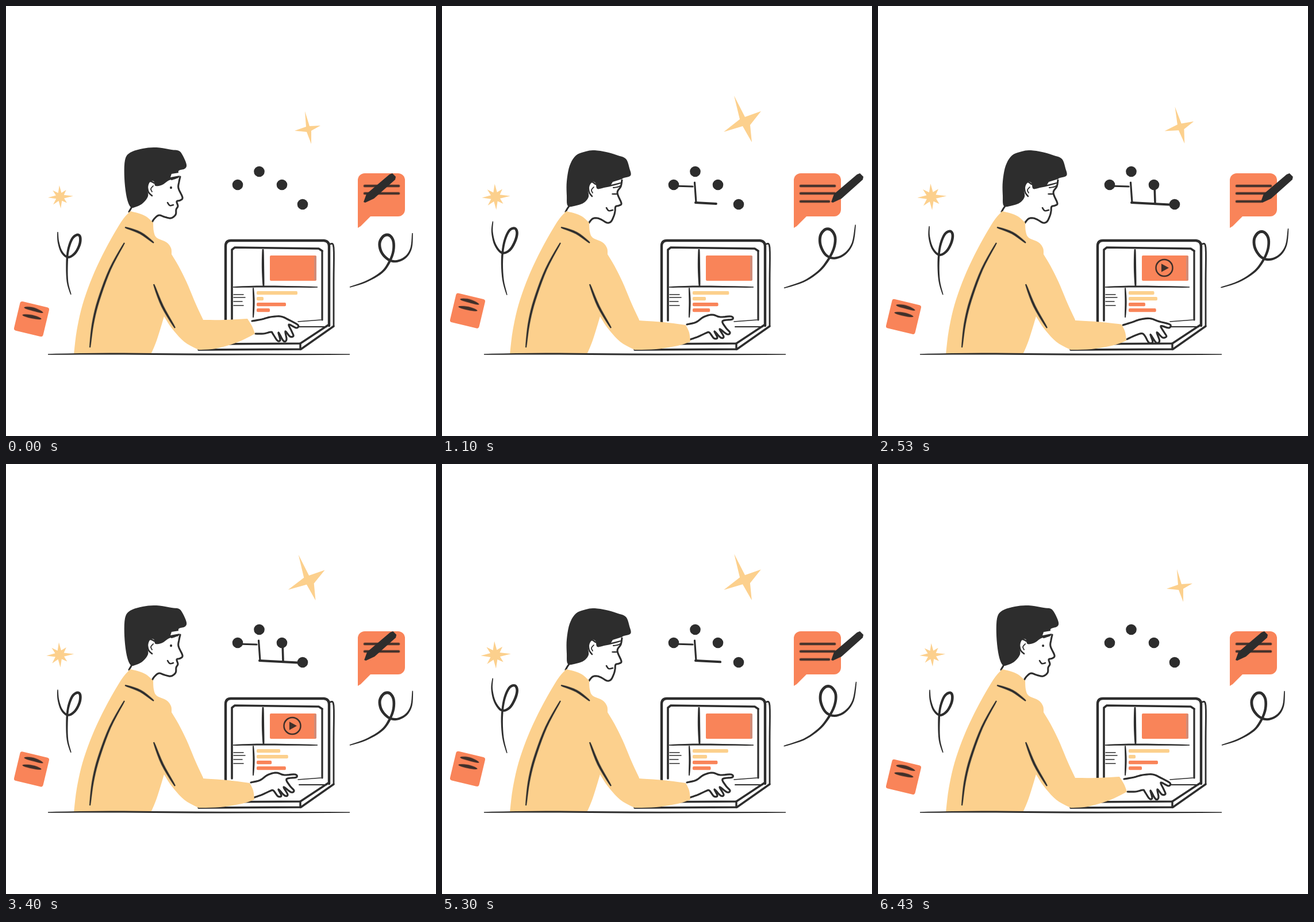
Animation, 748 px wide and 748 px high, one loop 6510 ms. Source, as an HTML page with a canvas:

```html
<!DOCTYPE html>
<html lang="en">
<head>
<meta charset="utf-8">
<title>Working at a laptop</title>
<style>
  html, body { margin: 0; width: 100%; height: 100%; overflow: hidden; background: #fff; }
  canvas { display: block; width: 748px; height: 748px; }
</style>
</head>
<body>
<canvas id="stage" width="748" height="748"></canvas>
<script>
const ctx = document.getElementById('stage').getContext('2d');
const LOOP = 6510;
const INK = '#2d2d2d', YELLOW = '#fcd08d', ORANGE = '#f98459', MARK = '#40302a';

const clamp = x => Math.max(0, Math.min(1, x));
const lin = (a, b, x) => clamp((x - a) / (b - a));
const ramp = (a, b, x) => { const k = lin(a, b, x); return k * k * (3 - 2 * k); };
const wave = (t, period) => (1 - Math.cos(2 * Math.PI * t / period)) / 2;
const lerp = (a, b, k) => a + (b - a) * k;
const mix = (a, b, k) => a.map((v, i) => lerp(v, b[i], k));

// Catmull-Rom samples through a flat list x, y, x, y...
function spline(p, closed) {
  const n = p.length / 2, out = [], last = closed ? n : n - 1, steps = 5;
  const at = (i, c) => p[2 * (closed ? (i + n) % n : Math.max(0, Math.min(n - 1, i))) + c];
  const value = (i, c, u) => {
    const a = at(i - 1, c), b = at(i, c), d = at(i + 1, c), e = at(i + 2, c);
    return b + 0.5 * u * (d - a + u * (2 * a - 5 * b + 4 * d - e + u * (3 * (b - d) + e - a)));
  };
  for (let i = 0; i < last; i++)
    for (let s = 0; s < steps; s++) out.push([value(i, 0, s / steps), value(i, 1, s / steps)]);
  out.push([at(last, 0), at(last, 1)]);
  return out;
}

function trace(points) {
  ctx.beginPath();
  for (const [x, y] of points) ctx.lineTo(x, y);
}

function fill(points, color) {
  trace(points);
  ctx.closePath();
  ctx.fillStyle = color;
  ctx.fill();
}

function stroke(points, width, color = INK) {
  trace(points);
  ctx.lineWidth = width;
  ctx.strokeStyle = color;
  ctx.stroke();
}

const curve = (p, width, color) => stroke(spline(p), width, color);

function poly(p, color) {
  const points = [];
  for (let i = 0; i < p.length; i += 2) points.push([p[i], p[i + 1]]);
  fill(points, color);
}

// Stroke that thins towards its ends, filled as one outline
function brush(p, width, color = INK, thin = 0.4) {
  const q = spline(p), n = q.length - 1, left = [], right = [];
  q.forEach(([x, y], i) => {
    const a = q[Math.max(0, i - 1)], b = q[Math.min(n, i + 1)];
    const dx = b[0] - a[0], dy = b[1] - a[1], len = Math.hypot(dx, dy) || 1;
    const full = Math.pow(Math.max(0, Math.sin(Math.PI * i / n)), 0.7);
    const h = width / 2 * lerp(thin, 1, full) / len;
    left.push([x - dy * h, y + dx * h]);
    right.unshift([x + dy * h, y - dx * h]);
  });
  fill(left.concat(right), color);
}

// Faint halo under a thinner core
function soft(draw) {
  ctx.globalAlpha = 0.35;
  draw(1.2);
  ctx.globalAlpha = 1;
  draw(-0.5);
}

function part(x1, y1, x2, y2, width, k) {
  if (k > 0) stroke([[x1, y1], [lerp(x1, x2, k), lerp(y1, y2, k)]], width);
}

function box(x, y, w, h, r, color) {
  ctx.beginPath();
  ctx.roundRect(x, y, w, h, r);
  ctx.fillStyle = color;
  ctx.fill();
}

function disc(x, y, rx, ry = rx, color = INK) {
  ctx.beginPath();
  ctx.ellipse(x, y, rx, ry, 0, 0, 2 * Math.PI);
  ctx.fillStyle = color;
  ctx.fill();
}

function stars(t, pulse) {
  poly(mix(
    [520, 183, 528, 209, 547, 208, 531, 217, 531, 240, 523, 219, 502, 217, 522, 210],
    [508, 156, 527, 193, 555, 183, 536, 207, 539, 237, 523, 209, 490, 219, 518, 197], pulse), YELLOW);

  const u = t % (LOOP / 4), peak = 450;
  const k = u < peak ? Math.sin(Math.PI / 2 * u / peak)
                     : Math.cos(Math.PI / 2 * (u - peak) / (LOOP / 4 - peak));
  const cx = lerp(94, 92.5, k), size = lerp(1, 1.19, k);
  const p = [];
  [23, 16, 20, 18, 21, 17, 20, 16].forEach((r, i) => {
    const a = i * Math.PI / 4 - 0.06, b = a + Math.PI / 8;
    p.push(cx + r * size * Math.cos(a), 332 + r * size * Math.sin(a));
    p.push(cx + 7.5 * size * Math.cos(b), 332 + 7.5 * size * Math.sin(b));
  });
  poly(p, YELLOW);
}

function squiggles(k) {
  brush(mix(
    [90, 393, 91, 410, 97, 428, 108, 437, 120, 430, 128, 415, 129, 402, 124, 398, 115, 405, 108, 425, 106, 450, 107, 480, 113, 502],
    [88, 369, 86, 388, 91, 411, 103, 427, 117, 423, 127, 407, 131, 392, 127, 383, 117, 387, 108, 408, 104, 440, 106, 475, 113, 503], k), 4.6, INK, 0.3);
  brush(mix(
    [598, 489, 625, 480, 650, 466, 663, 452, 673, 430, 674, 410, 667, 399, 657, 400, 650, 412, 653, 428, 665, 441, 680, 444, 696, 436, 705, 420, 707, 395],
    [594, 491, 630, 479, 656, 461, 672, 442, 684, 420, 687, 400, 680, 387, 670, 385, 661, 395, 660, 412, 668, 430, 683, 437, 702, 430, 717, 410, 723, 376], k), 5, INK, 0.3);
}

function note(dy) {
  ctx.save();
  ctx.translate(44.5, 544.5 - dy);
  ctx.save();
  ctx.rotate(0.235);
  box(-26, -26, 52, 52, 4, ORANGE);
  ctx.restore();
  soft(extra => {
    brush([-13, -20, 3, -17, 20, -11], 6 + extra, MARK, 0.1);
    brush([-16, -7, 1, -4, 17, 0], 6 + extra, MARK, 0.1);
  });
  ctx.restore();
}

function bubble(k) {
  box(612, 291, 82, 75, 12, ORANGE);
  poly([612, 340, 612, 386, 617, 383, 635, 365], ORANGE);
  const tip = lerp(622, 677, k);
  soft(extra => {
    const rule = (x, y) => stroke([[624, y], [x, y]], 4.2 + extra, MARK);
    rule(683, 313);
    rule(683, 326);
    if (tip > 625) rule(Math.min(tip, 673), 340);
  });
  ctx.save();
  ctx.translate(tip, 342);
  poly([0, -1, 5, -15, 45, -49, 50, -51, 56, -45, 55, -40, 18, -7, 3, 0], INK);
  ctx.restore();
}

function network(m) {
  part(403, 313, 436, 314, 3.2, ramp(80, 300, m));
  part(439.5, 307, 442, 342, 3.2, ramp(280, 500, m));
  part(441, 342, 516, 346, 4, lin(550, 1700, m));
  part(481, 311, 482, 342, 3.6, ramp(1230, 1650, m));
  disc(403, 311, 9.3);
  disc(440.5, 288, 9.3);
  disc(480, 311, 9.3);
  disc(516, 345, 9.3);
}

function laptop(t, m) {
  // lid and base
  ctx.lineWidth = 4.4;
  ctx.strokeStyle = INK;
  ctx.beginPath();
  ctx.moveTo(382, 550);
  ctx.lineTo(382, 418);
  ctx.quadraticCurveTo(382, 408, 391, 408);
  ctx.lineTo(553, 408);
  ctx.quadraticCurveTo(562, 409, 562, 418);
  ctx.lineTo(562, 556);
  ctx.stroke();
  curve([564, 414, 570, 420, 570, 480, 570, 557], 2.8);
  stroke([[570, 557], [513, 597], [335, 598]], 3.4);
  stroke([[365, 588], [512, 587], [562, 554]], 3.4);
  stroke([[512, 587], [512, 597]], 3.4);
  stroke([[510, 558], [558, 558]], 2);

  // screen
  stroke([[393, 547], [393, 424], [398, 420], [544, 422], [550, 426]], 3.6);
  stroke([[550, 426], [550, 546]], 3.2);
  stroke([[508, 549], [548, 546]], 1.6);
  brush([447, 423, 447, 455, 448, 488], 4.2, INK, 0.6);
  brush([395, 489, 450, 488, 542, 489], 3, INK, 0.5);
  brush([430, 490, 431, 515, 430, 542], 3.2, INK, 0.5);
  [[502, 413], [507, 416], [514, 411], [521, 413]].forEach(([y, x]) => stroke([[396, y], [x, y]], 1.5));

  // video card
  box(459, 434, 81, 44, 2, ORANGE);
  box(536, 435, 4, 42, 1, '#d08c78');
  const r = 14.5 * ramp(1250, 2000, m);
  if (r > 0.5) {
    ctx.beginPath();
    ctx.arc(498, 455.5, r, 0, 2 * Math.PI);
    ctx.lineWidth = 2.5;
    ctx.strokeStyle = MARK;
    ctx.stroke();
    poly([498 - r * 0.35, 455.5 - r * 0.5, 498 + r * 0.55, 455.5, 498 - r * 0.35, 455.5 + r * 0.5], MARK);
  }

  // chart
  const k = wave(t, LOOP);
  [[507, 477], [448, 491], [487, 462], [459, 487]].forEach(([a, b], i) =>
    box(436, 496 + i * 10, lerp(a, b, k) - 436, 6.2, 2, i < 2 ? YELLOW : ORANGE));
}

function head(k) {
  const pose = (a, b) => mix(a, b, k);
  fill(spline(pose(
    [217, 350, 210, 333, 206, 300, 207, 268, 216, 255, 238, 248, 262, 246, 288, 250, 301, 252, 308, 261, 314, 276, 311, 283,
     300, 287, 301, 298, 284, 303, 272, 311, 260, 313, 257, 305, 249, 306, 246, 318, 247, 331, 238, 343, 227, 349],
    [219, 348, 217, 330, 217, 305, 222, 278, 233, 260, 250, 253, 266, 251, 290, 255, 306, 260, 320, 266, 326, 282, 328, 295,
     314, 300, 312, 308, 296, 313, 282, 316, 270, 318, 267, 308, 260, 306, 254, 318, 255, 332, 247, 342, 234, 347]), true), INK);
  poly(pose([288, 292, 301, 290, 302, 295, 286, 298], [297, 306, 313, 301, 314, 306, 294, 311]), '#fff');

  const ear = spline(pose([258, 308, 250, 305, 246, 314, 248, 324, 254, 330], [267, 310, 260, 306, 255, 314, 256, 324, 261, 331]));
  fill(ear, '#fff');
  stroke(ear, 2.6);
  curve(pose([256, 313, 252, 318, 254, 323], [264, 315, 260, 320, 262, 325]), 1.8);

  curve(pose(
    [303, 297, 301, 306, 300, 317, 307, 333, 303, 338, 297, 340, 299, 348, 296, 354, 295, 363, 287, 369, 276, 367, 266, 364, 258, 370, 253, 378],
    [313, 303, 311, 314, 305, 325, 312, 343, 308, 347, 302, 349, 301, 357, 299, 365, 294, 375, 287, 377, 278, 372, 270, 369, 262, 370, 255, 378]), 3.1);
  curve(pose([281, 342, 285, 347, 291, 346], [286, 351, 290, 356, 297, 355]), 2.6);
  curve(pose([288, 302, 294, 300, 299, 298], [298, 316, 305, 315, 312, 312]), 2);
  disc(lerp(287, 300, k), lerp(316, 327, k), lerp(2, 5, k), lerp(2.2, 1.3, k));
  curve(pose([221, 346, 218, 351, 214, 358], [224, 345, 219, 351, 215, 358]), 3);
}

function body(k) {
  const pose = (a, b) => mix(a, b, k);
  const outline = [
    [216, 357, 200, 376, 172, 425, 150, 472, 133, 520, 123, 565, 118, 606],
    [252, 606, 262, 582, 275, 540],
    [275, 540, 288, 560, 310, 584, 335, 598],
    pose([335, 598, 365, 596, 405, 584, 433, 570], [335, 598, 372, 597, 410, 591, 432, 584]),
    pose([433, 570, 428, 557, 420, 544], [432, 584, 430, 568, 424, 555]),
    pose([420, 544, 380, 546, 343, 546], [424, 555, 385, 550, 343, 547]),
    [343, 546, 330, 518, 314, 480, 300, 452, 288, 432],
    [288, 432, 287, 421, 279, 411, 262, 403, 257, 392, 256, 377],
    [256, 377, 245, 367, 232, 361, 216, 357]
  ];
  fill(outline.flatMap(p => spline(p)), YELLOW);
  soft(extra => {
    brush([207, 385, 234, 395, 257, 412], 4 + extra, INK, 0.5);
    brush([206, 412, 181, 458, 161, 512, 151, 553, 146, 594], 3.8 + extra, INK, 0.5);
    brush([257, 484, 272, 522, 294, 560], 4 + extra, INK, 0.5);
  });
}

const HAND_DOWN = [428, 548, 445, 545, 460, 541, 478, 540, 492, 546, 508, 555, 505, 560, 492, 554, 497, 566, 500, 574, 494, 575,
  486, 566, 488, 580, 483, 583, 474, 568, 477, 581, 472, 582, 464, 570, 461, 567, 448, 570, 434, 570];
const HAND_MID = [426, 556, 441, 551, 455, 546, 472, 544, 488, 549, 508, 554, 506, 560, 492, 557, 498, 568, 502, 575, 495, 577,
  485, 568, 490, 583, 484, 586, 474, 572, 478, 585, 471, 586, 464, 574, 458, 570, 446, 574, 433, 581];
const HAND_UP = [426, 554, 442, 550, 455, 541, 470, 537, 484, 541, 503, 540, 505, 545, 488, 548, 494, 560, 501, 568, 496, 571,
  483, 562, 490, 575, 485, 577, 474, 566, 479, 577, 473, 578, 465, 568, 459, 569, 446, 575, 432, 580];

function hand(pulse) {
  const p = spline(pulse < 0.4 ? mix(HAND_DOWN, HAND_MID, lin(0.05, 0.32, pulse))
                               : mix(HAND_MID, HAND_UP, lin(0.5, 0.9, pulse)));
  fill(p, '#fff');
  stroke(p, 3.2);
}

function draw(t) {
  const half = t % (LOOP / 2);
  const mirrored = Math.min(t, LOOP - t);
  const pulse = wave(t + 30, LOOP / 3);
  const nod = ramp(130, 480, half) * (1 - ramp(2780, 3200, half));
  const writing = ramp(70, 950, half) * (1 - ramp(2275, 3155, half));

  ctx.fillStyle = '#fff';
  ctx.fillRect(0, 0, 748, 748);
  ctx.lineCap = ctx.lineJoin = 'round';

  stars(t, pulse);
  squiggles(wave(t, LOOP / 2));
  note(14.5 * pulse);
  bubble(writing);
  network(mirrored);
  laptop(t, mirrored);
  head(nod);
  hand(pulse);
  body(lin(0.05, 0.32, pulse));
  brush([73, 606, 180, 605, 330, 606, 598, 606], 3, INK, 0.5);
}

// The picture changes at 0 and 30 ms of every 100 ms
function step(t) {
  const base = Math.floor(t / 100) * 100;
  return Math.min(t - base < 30 ? base : base + 30, 6430);
}

const start = performance.now();
let shown = -1;
function tick() {
  const t = step((performance.now() - start) % LOOP);
  if (t !== shown) draw(shown = t);
  requestAnimationFrame(tick);
}
tick();
</script>
</body>
</html>
```
